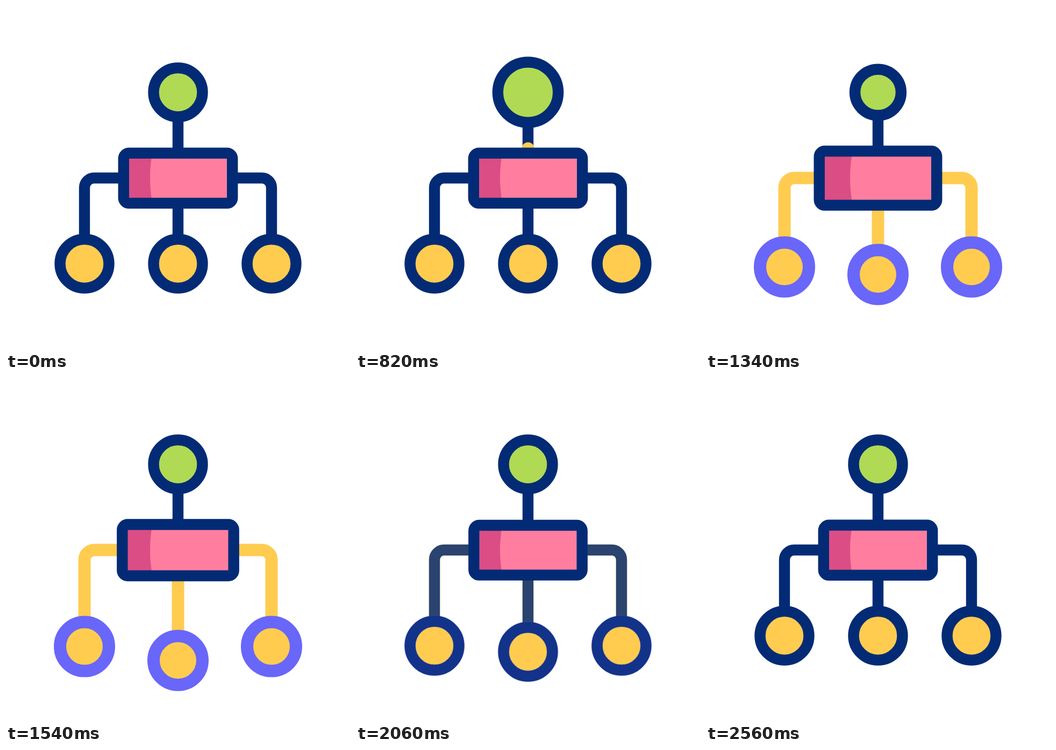
Write an HTML page with a canvas that moves like this. It is 640 by 640 pixels and loops after 2800 ms.

```html
<!DOCTYPE html>
<html lang="en">
<head>
<meta charset="utf-8">
<title>Hierarchy pulse</title>
<style>
  html, body { margin: 0; width: 100%; height: 100%; overflow: hidden; background: #fff; }
  canvas { display: block; }
</style>
</head>
<body>
<canvas id="stage" width="640" height="640"></canvas>
<script>
const ctx = document.getElementById('stage').getContext('2d');
const LOOP = 2800, LINE = 20.4, GLOW = 23, RADIUS = 45.5, CX = 320, CY = 320;
const NAVY = '#032b75', YELLOW = '#ffcc50', PURPLE = '#6966fa';
const GREEN = '#b0da54', PINK = '#ff7ea0', ROSE = '#db4d85';

// Eased value at time t through [time, value] keys.
function tween(t, ...keys) {
  if (t <= keys[0][0]) return keys[0][1];
  for (let i = 1; i < keys.length; i++) {
    const [t0, v0] = keys[i - 1], [t1, v1] = keys[i];
    if (t < t1) {
      const u = (t - t0) / (t1 - t0);
      return v0 + (v1 - v0) * u * u * (3 - 2 * u);
    }
  }
  return keys[keys.length - 1][1];
}

function stroke(path, color, width, alpha = 1) {
  ctx.globalAlpha = alpha;
  ctx.strokeStyle = color;
  ctx.lineWidth = width;
  ctx.stroke(path);
  ctx.globalAlpha = 1;
}

// Yellow part of a link between two distances along it.
function pulse(path, from, to, alpha = 1) {
  if (to - from < 0.1 || alpha <= 0) return;
  ctx.lineCap = 'round';
  ctx.setLineDash([to - from, 2000]);
  ctx.lineDashOffset = -from;
  stroke(path, YELLOW, GLOW, alpha);
  ctx.setLineDash([]);
  ctx.lineCap = 'butt';
}

function ball(x, y, r, fill, glow = 0) {
  const path = new Path2D();
  path.arc(x, y, r, 0, Math.PI * 2);
  ctx.fillStyle = fill;
  ctx.fill(path);
  stroke(path, NAVY, LINE);
  if (glow > 0) stroke(path, PURPLE, GLOW, glow);
}

function branch(side, y, reach, alpha, glow) {
  const x = CX + side * 174;
  const path = new Path2D();
  let length;
  if (side) {
    path.moveTo(CX + side * 101, CY);
    path.lineTo(x - side * 18, CY);
    path.arcTo(x, CY, x, CY + 18, 18);
    length = 83 + y - CY - 18;
  } else {
    path.moveTo(CX, 370);
    length = y - 370;
  }
  path.lineTo(x, y);
  stroke(path, NAVY, LINE);
  pulse(path, 0, reach * (length - RADIUS), alpha);
  ball(x, y, RADIUS, YELLOW, glow);
}

function box(scale) {
  const w = 101.2 * scale, h = 46.6 * scale;
  const path = new Path2D();
  path.roundRect(CX - w, CY + 0.3 - h, w * 2, h * 2, 10);
  ctx.fillStyle = PINK;
  ctx.fill(path);
  ctx.save();
  ctx.clip(path);
  ctx.fillStyle = ROSE;
  ctx.beginPath();
  ctx.moveTo(190, 260);
  ctx.lineTo(275, 260);
  ctx.quadraticCurveTo(261, 320, 275, 380);
  ctx.lineTo(190, 380);
  ctx.fill();
  ctx.restore();
  stroke(path, NAVY, LINE);
}

function draw(t) {
  ctx.fillStyle = '#fff';
  ctx.fillRect(0, 0, 640, 640);

  const reach = tween(t, [1055, 0], [1300, 1]);
  const fade = tween(t, [1880, 1], [2120, 0]);
  const midY = 479.4 + tween(t, [1062, 0], [1846, 69.5], [2290, -13.5], [2540, 0]);
  const sideY = 479.4 + tween(t, [1155, 0], [1882, 37], [2310, -11.5], [2560, 0]);
  const midGlow = tween(t, [1062, 0], [1270, 1]) * fade;
  const sideGlow = tween(t, [1130, 0], [1330, 1]) * fade;
  branch(-1, sideY, reach, fade, sideGlow);
  branch(1, sideY, reach, fade, sideGlow);
  branch(0, midY, reach, fade, midGlow);

  const stem = new Path2D();
  stem.moveTo(CX, 205);
  stem.lineTo(CX, 274);
  stroke(stem, NAVY, LINE);
  pulse(stem, tween(t, [620, 0], [880, 69]), tween(t, [430, 0], [690, 69]));

  box(tween(t, [930, 1], [1360, 1.08], [1740, 0.96], [2150, 1]));
  ball(CX, 160.6, RADIUS * tween(t, [310, 1], [760, 1.26], [1140, 0.89], [1550, 1]), GREEN);
}

function frame() {
  draw(performance.now() % LOOP);
  requestAnimationFrame(frame);
}
frame();
</script>
</body>
</html>
```
